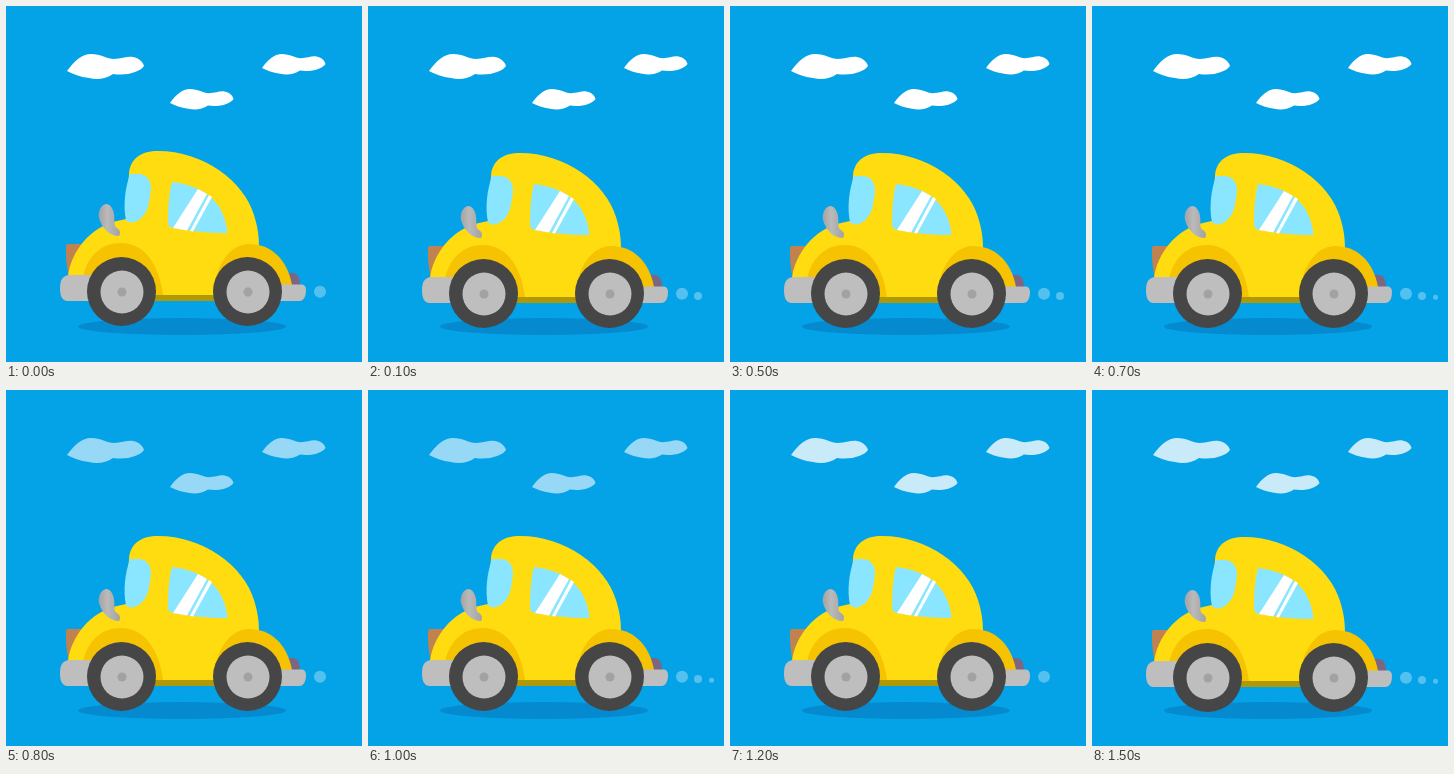
Animation, 356 px wide and 356 px high, one loop 1.6 s. Source, as an HTML page:

```html
<!DOCTYPE html>
<html lang="en">
<head>
<meta charset="utf-8">
<title>Little car</title>
<style>
html, body { margin: 0; width: 100%; height: 100%; overflow: hidden; background: #04a3e8; }
svg { display: block; width: 100%; height: 100%; }
</style>
</head>
<body>
<svg viewBox="0 0 356 356">
  <defs>
    <linearGradient id="chrome">
      <stop offset="0" stop-color="#a3a3a5"/>
      <stop offset=".4" stop-color="#bababa"/>
      <stop offset="1" stop-color="#a2a2a2"/>
    </linearGradient>
    <g id="wheel">
      <circle r="34.5" fill="#464646"/>
      <circle cx=".5" cy=".5" r="21.5" fill="#bebebe"/>
      <circle cx=".5" cy=".5" r="4.5" fill="#a2a2a2"/>
    </g>
    <path id="cloud" d="M0 17C7 7 15 0 24 0C34 0 40 5 47 5C55 5 60 2 66 3C72 4 76 8 77 12C73 18 60 22 46 20C39 25 30 26 22 24C13 23 6 20 0 17Z"/>
  </defs>
  <rect width="356" height="356" fill="#04a3e8"/>
  <g id="clouds" fill="#fff">
    <use href="#cloud" x="61" y="48"/>
    <use href="#cloud" transform="translate(164 83) scale(.825)"/>
    <use href="#cloud" transform="translate(256 48) scale(.825)"/>
  </g>
  <ellipse cx="176" cy="320.5" rx="104" ry="8.5" fill="#058acf"/>
  <g id="car">
    <g id="smoke" fill="#fff" fill-opacity=".32">
      <circle cx="314" cy="285.8" r="6"/>
      <circle cx="330" cy="288" r="4"/>
      <circle cx="343.5" cy="289.3" r="2.5"/>
    </g>
    <path fill="#c1824f" d="M62 238H78L70 270H63C60 259 60 249 60 241Q60 238 62 238Z"/>
    <path fill="#7d6682" d="M280 267H288Q294 268 294 280H280Z"/>
    <path fill="#b19807" d="M140 286H220V295H140Z"/>
    <path fill="#ffdc10" d="M62 270C65 246 84 221 111 215L120 213L123 168C124 152 136 145 152 145C197 145 238 175 248 209C252 222 253 230 253 242L250 289H64Z"/>
    <path fill="#f6c302" d="M76 276C80 249 96 237 115 237C139 237 153 259 157 289H80Z"/>
    <path fill="#f6c302" d="M207 289C209 259 224 238 243 238C264 238 281 252 286 279V289Z"/>
    <path fill="#8ae6ff" d="M124 168C119 182 117 200 120 214C122 217 127 217 131 215C140 210 143 201 144 190C147 178 143 168 132 168Z"/>
    <path fill="#8ae6ff" d="M166 176C192 179 218 191 221.500 227C202 227 185 225 167 222Q162 221 162 217C162 201 163 187 166 176Z"/>
    <path fill="#fff" d="M192 183L201 188L181 224.500L167 222ZM203 189L206 191L187 225.500L184 225Z"/>
    <path fill="url(#chrome)" d="M100 198C94 199 92 207 93 212C96 222 103 230 113 230C115 227 114 224 111 222C107 220 109 215 108 208C107 202 104 198 100 198Z"/>
    <path fill="#bebebe" d="M64 269H96V295H61C55 294 54 288 54 282C54 274 57 269 64 269Z"/>
    <path fill="#bebebe" d="M265 278.500H296Q300 279 300 284C300 290 298 295 293 295H265Z"/>
    <use href="#wheel" x="115.500" y="285.500"/>
    <use href="#wheel" x="241.500" y="285.500"/>
  </g>
</svg>
<script>
const STEP = 100, LOOP = 1600;
const cloudAlpha = [1, 1, 0.58, 0.78];
const puffCount = [1, 2, 3, 3];
const byId = id => document.getElementById(id);
const car = byId("car"), clouds = byId("clouds");
const puffs = [...byId("smoke").children];

function draw(ms) {
  const step = Math.floor(ms % LOOP / STEP);
  const beat = step % 4;
  const drop = step === 0 ? 0 : 1 + step % 2;
  car.setAttribute("transform", `translate(0 ${drop})`);
  clouds.setAttribute("opacity", cloudAlpha[Math.floor(step / 4)]);
  puffs.forEach((puff, i) => puff.setAttribute("visibility", i < puffCount[beat] ? "visible" : "hidden"));
}

const start = performance.now();
function tick() {
  draw(performance.now() - start);
  requestAnimationFrame(tick);
}
tick();
</script>
</body>
</html>
```
